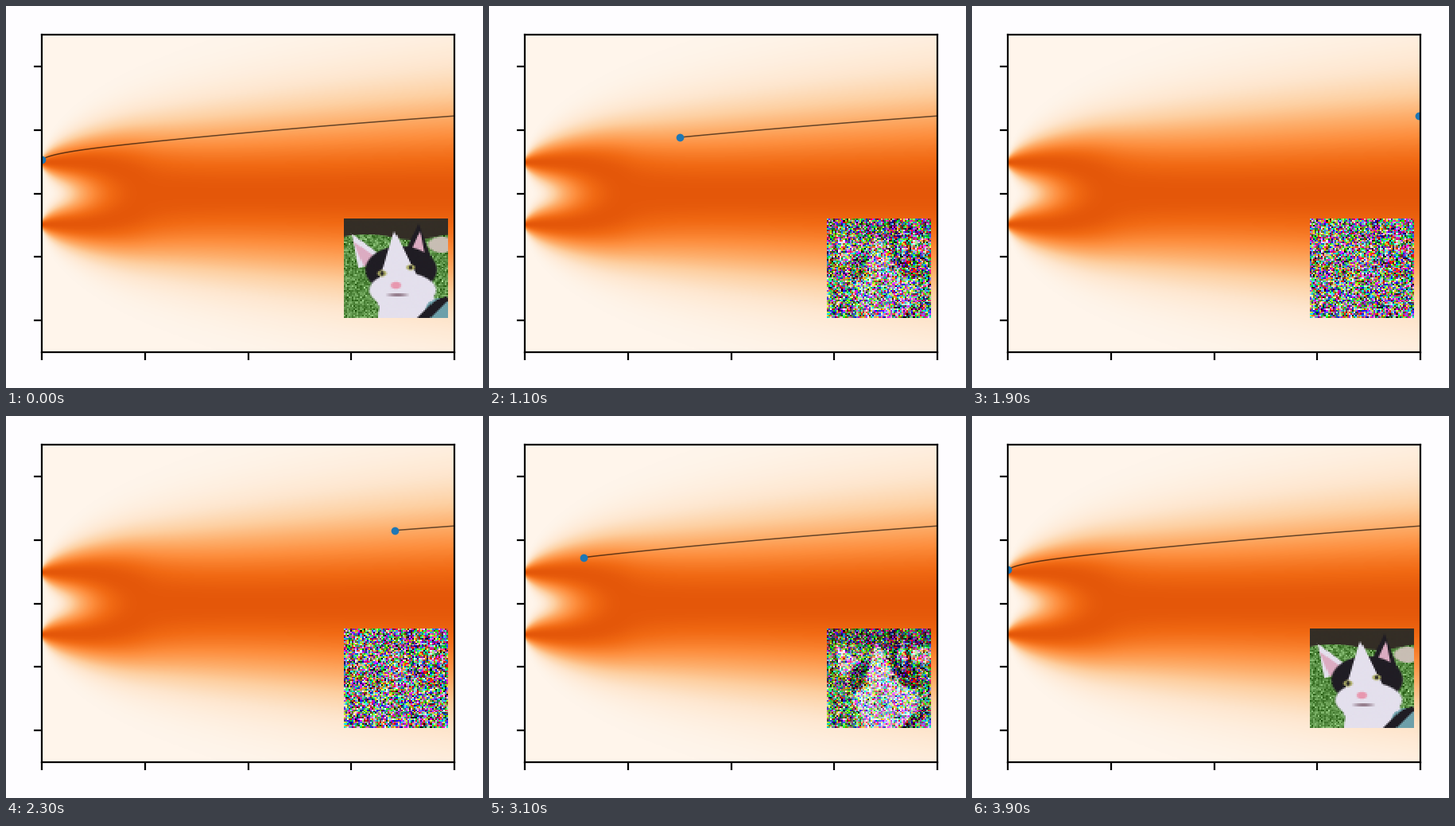
Write a matplotlib script that moves like this. It is 600 px wide and 480 px high and loops after 4000 ms.

```python
import math

import numpy as np
import matplotlib.pyplot as plt
from matplotlib.animation import FuncAnimation

W, H, DPI = 600, 480, 200
FRAMES, INTERVAL = 40, 100
MODE, VAR0 = 0.5, 0.0025      # mixture centres and starting variance
CELLS = 64
DECAY = 5.3                   # how fast the picture fades into noise

phi = np.vectorize(lambda z: 0.5 * (1 + math.erf(z / math.sqrt(2))))


def sigma(t):
    return np.sqrt(t + VAR0)


def density(y, t):
    return sum(np.exp(-0.5 * ((y - m) / sigma(t)) ** 2) for m in (MODE, -MODE))


def cdf(y, t):
    return sum(phi((y - m) / sigma(t)) for m in (MODE, -MODE)) / 2


def flow(t, end=1.22):
    """Follow the constant quantile that reaches `end` at t = 1."""
    level = cdf(end, 1.0)
    lo, hi = np.full_like(t, 0.2), np.full_like(t, 1.6)
    for _ in range(25):
        mid = (lo + hi) / 2
        below = cdf(mid, t) < level
        lo, hi = np.where(below, mid, lo), np.where(below, hi, mid)
    return (lo + hi) / 2


def progress(i):
    """Swing from 0 to 1 and back, lingering at the start."""
    return math.sin(math.pi * (i + 0.5) / FRAMES) ** 4.06


def cat_picture(rng):
    """A black and white cat on grass, from a few soft-edged shapes."""
    v, u = np.mgrid[0:CELLS, 0:CELLS] + 0.5
    black, white, pink = (32, 29, 36), (228, 224, 237), (220, 172, 194)

    def paint(img, rgb, depth):
        """Blend a colour in where depth, in cells, is positive."""
        cover = np.clip(depth + 0.5, 0, 1)[..., None]
        return img * (1 - cover) + np.array(rgb) * cover

    def oval(cx, cy, rx, ry):
        return (1 - np.hypot((u - cx) / rx, (v - cy) / ry)) * min(rx, ry)

    def wedge(tip, base, half):
        """Triangle from its tip to the middle of its base."""
        dx, dy = base[0] - tip[0], base[1] - tip[1]
        size = math.hypot(dx, dy)
        along = ((u - tip[0]) * dx + (v - tip[1]) * dy) / size
        across = np.abs((u - tip[0]) * dy - (v - tip[1]) * dx) / size
        return np.minimum(half * along / size - across, size - along)

    img = np.full((CELLS, CELLS, 3), (90, 144, 70), float)
    img += rng.normal(0, 1, (CELLS, CELLS, 1)) * 26
    img = paint(img, (52, 46, 38), 12 - 2 * np.sin(u / 9) - v)
    img = paint(img, (200, 190, 180), oval(60, 17, 8, 5))

    img = paint(img, white, oval(40, 64, 19, 22))
    img = paint(img, (110, 160, 170), oval(59, 61, 9, 10))
    img = paint(img, black, 2 - np.abs(u + v - 113) / 2 - np.clip(52 - v, 0, 9))

    for tip, base, half, fur in (((5, 10), (16, 28), 8, white),
                                 ((46, 3), (45, 25), 9, black)):
        img = paint(img, fur, wedge(tip, base, half))
        inner = (tip[0] + 1, tip[1] + 5)
        img = paint(img, pink, wedge(inner, base, half * 0.6))

    img = paint(img, black, oval(35, 33, 22, 15))
    img = paint(img, white, oval(36, 46, 20.5, 11))
    img = paint(img, white, oval(34, 52, 14, 10))
    img = paint(img, white, wedge((31, 8), (34, 44), 14))

    for cx, cy in ((23.5, 35.5), (41, 31.5)):
        img = paint(img, (172, 172, 100), oval(cx, cy, 2.8, 2))
        img = paint(img, black, oval(cx, cy, 1, 1.4))
    img = paint(img, (232, 152, 176), oval(32, 43, 3, 2.2))
    img = paint(img, (130, 102, 118), oval(33, 49, 5, 0.8))
    return np.clip(img / 255, 0, 1)


def box(x0, y0, x1, y1):
    """Axes rectangle from pixel corners measured from the top left."""
    return [x0 / W, 1 - y1 / H, (x1 - x0) / W, (y1 - y0) / H]


fig = plt.figure(figsize=(W / DPI, H / DPI), dpi=DPI, facecolor="#fefdff")
ax = fig.add_axes(box(45, 36, 564, 435))

# density, scaled to the same peak in every column and drawn a touch narrow
y = 1.02 * np.linspace(2.5, -2.5, 400)[:, None]
p = density(y, np.linspace(0, 1, 520)[None, :])
p /= p.max(axis=0)
ax.imshow(p, cmap="Oranges", vmin=0, vmax=1 / 0.69, aspect="auto",
          extent=(0, 1, -2.5, 2.5), interpolation="bilinear")
ax.set(xlim=(0, 1), ylim=(-2.5, 2.5),
       xticks=np.linspace(0, 1, 5), yticks=range(-2, 3))
ax.tick_params(labelbottom=False, labelleft=False, width=0.8, length=3.5)

path_t = np.linspace(0, 1, 300) ** 2
path_y = flow(path_t)
line, = ax.plot([], [], color="black", alpha=0.6, lw=0.55)
dot, = ax.plot([], [], "o", color="#1f77b4", ms=3.5, mew=0, zorder=2.3)

rng = np.random.default_rng(4)
cat = cat_picture(rng)
grain = rng.normal(size=cat.shape)
inset = fig.add_axes(box(425.5, 267, 555.5, 391.5))
inset.axis("off")
photo = inset.imshow(cat, aspect="auto", interpolation="nearest")


def noisy(t):
    """Mix picture and noise around mid grey with constant variance."""
    keep = math.exp(-DECAY * t)
    mix = math.sqrt(keep) * (cat - 0.5) + 0.5 * math.sqrt(1 - keep) * grain
    return np.clip(0.5 + mix, 0, 1)


def update(i):
    t = progress(i)
    here = np.interp(t, path_t, path_y)
    ahead = path_t > t
    line.set_data(np.r_[t, path_t[ahead]], np.r_[here, path_y[ahead]])
    dot.set_data([t], [here])
    photo.set_data(noisy(t))
    return line, dot, photo


anim = FuncAnimation(fig, update, frames=FRAMES, interval=INTERVAL,
                     repeat=True, repeat_delay=0, blit=False)
plt.show()
```
